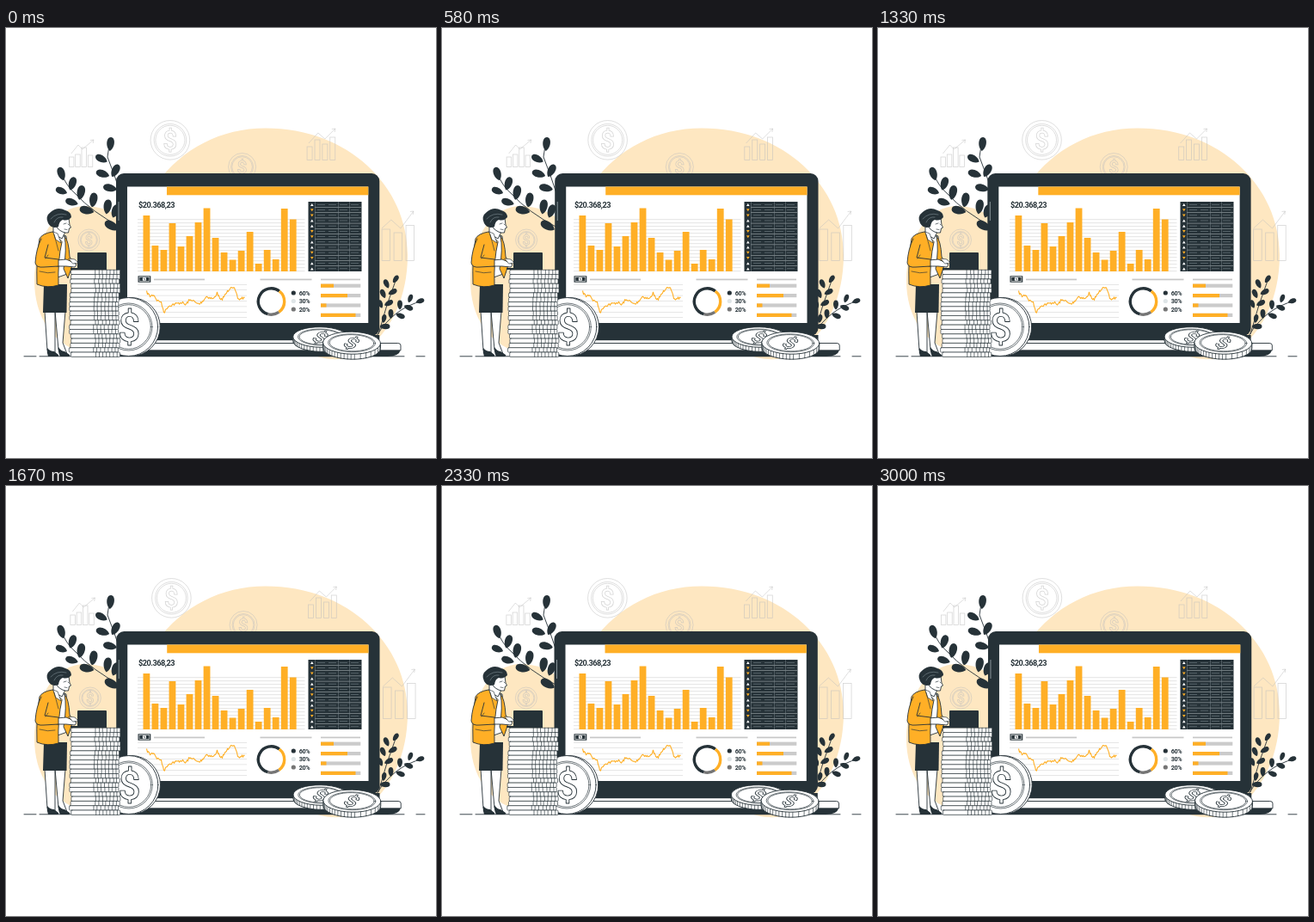
Animation of 500 by 500 pixels, one loop 3040 ms. Source, as an HTML page:

```html
<!DOCTYPE html>
<html lang="en">
<head>
<meta charset="utf-8">
<title>Finance dashboard</title>
<style>
html, body { margin: 0; width: 100%; height: 100%; overflow: hidden; background: #fff; }
svg { display: block; width: 100vw; height: 100vh; }
text { font-family: Roboto, "Liberation Sans", sans-serif; font-weight: 700; }
.ink { fill: #263238; }
.gold { fill: #ffaf26; }
.cream { fill: #fee7c1; }
.line { fill: #fff; stroke: #263238; stroke-width: .9; stroke-linejoin: round; stroke-linecap: round; }
.bare { fill: none; }
.coat { fill: #ffaf26; }
.thin { stroke-width: .65; }
.icon { fill: none; stroke: #bdbdbd; stroke-opacity: .65; stroke-width: .75; }
.sign { text-anchor: middle; font-weight: 500; }
.stem { fill: none; stroke: #263238; stroke-width: .9; }
</style>
</head>
<body>
<svg viewBox="0 0 500 500">
  <g class="cream">
    <path d="M175 181C205 140 250 116.500 302 116.500C398 116.500 467 184 467 264C467 314 447 350 424 370C409 385 386 388 366 383L300 366Z"/>
    <path d="M92 207C56 207 33 247 33 294C33 335 54 369 92 378H140V226C126 213 108 207 92 207Z"/>
  </g>
  <g id="icons" class="icon"></g>
  <g id="plants" class="ink"></g>
  <path class="line bare" d="M21 381.800H35M39 381.800H463M477 381.800H487"/>
  <g id="laptop"></g>
  <g id="screen"></g>
  <g id="coins"></g>
  <g id="woman">
    <path class="line" d="M45 329L48 375L57 379L57 329ZM57 329L61 374L71 379L66 366L69 329Z"/>
    <path class="ink" d="M44 298H71L70.500 331H43Z"/>
    <path class="ink" d="M48 372Q51 376 56 376L61 380Q62 382 59 382H49Q47 377 48 372ZM61 371Q64 376 68 376L74 380Q75 382 72 382H63Q60 376 61 371Z"/>
    <path class="line" d="M59 238L70 242L74 285L60 290Z"/>
    <path class="line" d="M55 229L55 239L65 245L69 237Z"/>
    <path class="line" d="M56 220L73 221L74 229L75.500 232L73.500 233L72.500 238Q66 239 60 233Z"/>
    <path class="ink" d="M49 227Q45 219 52 214Q60 207 69 212Q76 214 76 220Q72 225 66 223Q62 224 61 231Q53 234 49 227Z"/>
    <path class="line bare thin" style="stroke:#78858b" d="M52 222Q59 214 70 217M56 226Q59 219 66 220"/>
    <path class="line bare thin" d="M67 228L70 227M72 228L73 229M68 234L71 234.500"/>
    <path class="line coat" d="M54 237Q42 239 39 245Q35 266 36 298Q48 303 61 299Q60 270 65 249Z"/>
    <path class="line coat" d="M68 242Q73 247 74 266L78 273L72 291L67 280Q71 257 68 242Z"/>
    <path class="line thin" d="M55 237L60 239L64 250L58 246Z"/>
    <path class="line" d="M59 270L70 269L77 272L82 275L80 278L70 277L59 277Z"/>
    <path class="line coat" d="M41 245Q35 257 34 273Q35 279 44 278L61 277V269L45 267L49 252"/>
    <path class="line bare thin" d="M39 283Q49 286 57 284M46 268L49 264M56 240L61 259"/>
    <path class="line thin" d="M73 268L80 269L84 273L78 274Z"/>
    <path class="ink" d="M83 262Q83 261 84 261H116Q117 261 117 262V281H83ZM75 279H117V281H75Z"/>
  </g>
</svg>
<script>
const NS = "http://www.w3.org/2000/svg";
const $ = id => document.getElementById(id);

function add(parent, tag, attrs, text) {
  const el = document.createElementNS(NS, tag);
  for (const k in attrs) el.setAttribute(k, attrs[k]);
  if (text) el.textContent = text;
  parent.append(el);
  return el;
}
const rect = (p, x, y, width, height, attrs) => add(p, "rect", { x, y, width, height, ...attrs });
const path = (p, d, attrs) => add(p, "path", { d, ...attrs });
const circle = (p, cx, cy, r, attrs) => add(p, "circle", { cx, cy, r, ...attrs });
const dollar = (p, x, y, size, attrs, turn = "") => add(p, "text", {
  "font-size": size, y: size * .36, transform: `translate(${x} ${y}) ${turn}`, ...attrs
}, "$");

let seed = 7;
const rnd = () => (seed = seed * 16807 % 2147483647) / 2147483647;

// Outline icons
const icons = $("icons");
function growth(x, base, w, step, tops, arrow) {
  tops.forEach((y, i) => rect(icons, x + i * step, y, w, base - y));
  path(icons, "M" + arrow);
  const [ax, ay] = arrow.split(" ").slice(-2).map(Number);
  path(icons, `M${ax - 4} ${ay + .5}L${ax} ${ay}L${ax - .7} ${ay + 4}`);
}
growth(73.5, 161.5, 5.5, 7.3, [150, 147, 139, 148], "76 146 L 84 136 L 89 141 L 102 130");
growth(350.2, 153.5, 6, 8.9, [138, 130, 135, 127], "352 134 L 363 122 L 371 129 L 383 117");
growth(437.2, 270.5, 9.5, 14, [234, 238, 229.5], "437 233 L 448 223 L 459 233 L 474 213");
function token(x, y, radii, size) {
  radii.forEach(r => circle(icons, x, y, r));
  dollar(icons, x, y, size, { class: "sign" });
}
token(191, 130.3, [22.8, 18.8, 17], 30);
token(274.7, 161.5, [16, 13, 11.8], 21);
token(96.5, 246.5, [12.5, 10, 9], 16);

// Plants: x, y, angle, half length per leaf
const plants = $("plants");
function plant(stem, leaves, fat) {
  path(plants, stem, { class: "stem" });
  for (const [x, y, a, l] of leaves)
    path(plants, `M0 ${l}C${-fat * l} ${l * .5} ${-fat * l} ${-l} 0 ${-l}C${fat * l} ${-l} ${fat * l} ${l * .5} 0 ${l}`,
      { transform: `translate(${x} ${y}) rotate(${a})` });
}
plant("M134 195Q126 170 118 150Q119 142 121 132", [
  [121.5, 135, 5, 8], [111, 152, -62, 7.5], [127, 166, 28, 8], [112.5, 169.5, -72, 8], [121, 186, -78, 8]
], .72);
plant("M134 232Q100 214 81 193Q70 184 64 168", [
  [64.5, 169.5, -18, 8], [77, 181, 18, 8], [64.5, 189.5, -68, 7], [87, 191.5, 12, 8.5], [76.5, 202.5, -72, 7.5],
  [101.5, 200, 10, 8.5], [94, 212, -76, 8.5], [118, 208, 8, 8.5], [123, 230, -60, 9], [127, 213, 20, 8]
], .72);
plant("M433 356Q442 322 454 291", [
  [453, 292, 35, 5], [442.5, 297.5, -25, 5.5], [449.5, 307, 62, 5.5], [438.5, 309, -25, 5.5], [445, 320, 62, 5.5], [435.500, 321, -20, 5]
], .72);
plant("M431 358Q450 326 485 317", [
  [481.500, 317.500, 72, 5], [470, 314.500, 20, 5], [468, 325, 112, 5.5], [458, 322, 0, 5.500], [458.500, 334.500, 112, 5.5],
  [447.500, 332.500, 0, 5.5], [440.500, 347, 90, 6], [439.5, 338, 10, 5]
], .72);

// Laptop body
const laptop = $("laptop");
path(laptop, "M120 362.800H340V366.500H120Z", { class: "line thin" });
rect(laptop, 128.2, 169, 306.3, 189, { rx: 9, class: "ink" });
path(laptop, "M176 357H434.500V363H176Z", { class: "ink" });
path(laptop, "M131.200 202V224", { stroke: "#8a969b", "stroke-width": 1 });
rect(laptop, 141.2, 184.5, 280.3, 158.5, { fill: "#fff" });
rect(laptop, 187.2, 184.5, 234.3, 9.8, { class: "gold" });
path(laptop, "M130 374.500H459Q457 382 444 382H130Z", { class: "ink" });
path(laptop, "M130 366.500H456Q459.200 366.500 459.200 369V374.800H130Z", { class: "line" });

// Dashboard contents
const screen = $("screen");
add(screen, "text", { x: 154, y: 209, "font-size": 9.2, "letter-spacing": -.5, class: "ink" }, "$20.368,23");
for (let y = 222.5; y < 284; y += 4) rect(screen, 153, y, 194.5, .6, { fill: "#d2d2d2" });
[218, 253, 258, 227, 254, 242, 226, 209.5, 244, 261, 269.5, 259, 237, 274, 258, 269, 210, 222.5]
  .forEach((y, i) => rect(screen, 159.5 + i * 10.02, y, 7.8, 283 - y, { class: "gold" }));

rect(screen, 351.5, 202, 62, 81, { class: "ink" });
for (let i = 0; i < 13; i++) {
  const y = 202 + i * 6.2;
  if (i) rect(screen, 359, y, 54, .55, { fill: "#aeb6b9" });
  const down = i % 4 === 1 || i % 4 === 2;
  path(screen, down ? `M354 ${y + 2}h3.600l-1.800 3z` : `M354 ${y + 5}h3.600l-1.800 -3z`, { fill: down ? "#ffaf26" : "#fff" });
  for (const x of [362, 375, 388, 401])
    rect(screen, x, y + 3, 9, .7, { fill: "#69767c" });
}
for (const x of [359, 386, 399.5]) rect(screen, x, 202, .5, 81, { fill: "#78858a" });

rect(screen, 153.5, 288.3, 14.8, 7.4, { class: "ink" });
rect(screen, 155, 289.4, 11.8, 5.2, { fill: "none", stroke: "#fff", "stroke-width": .6 });
circle(screen, 160.9, 292, 2.2, { fill: "#fff" });
dollar(screen, 160.9, 292, 4, { class: "ink sign" });
[[172, 59], [295.5, 60], [366, 46]].forEach(([x, w]) => rect(screen, x, 291.6, w, 1.7, { fill: "#c7c7c7" }));

for (let y = 298; y < 338; y += 6.4) rect(screen, 153, y, 127, .6, { fill: "#d6d6d6" });
const trend = [307, 312, 310, 317, 318, 331, 324, 322, 321, 320, 319, 322, 317, 316, 320, 321, 317, 312, 314, 315, 308, 317, 312, 306, 300, 304, 316, 314, 314];
let d = "";
for (let x = 0; x <= 114; x++) {
  const k = Math.min(x / 4.1, 27.99), i = Math.floor(k);
  const y = trend[i] + (trend[i + 1] - trend[i]) * (k - i) + (rnd() - .5) * 3;
  d += (x ? "L" : "M") + (163.5 + x) + " " + y.toFixed(1);
}
path(screen, d, { fill: "none", stroke: "#ffaf26", "stroke-width": 1.1 });

function arc(from, to, stroke) {
  const at = a => `${308.5 + 15.2 * Math.cos(a * Math.PI / 180)} ${318 + 15.2 * Math.sin(a * Math.PI / 180)}`;
  path(screen, `M${at(from)}A15.200 15.200 0 ${+(to - from > 180)} 1 ${at(to)}`, { fill: "none", stroke, "stroke-width": 3.4 });
}
arc(105, 308, "#263238");
arc(-52, 55, "#ffaf26");
arc(55, 105, "#757575");
["60%", "30%", "20%"].forEach((label, i) => {
  const y = 308 + i * 9.5;
  circle(screen, 334.3, y, 2.6, { fill: ["#263238", "#dfe5e7", "#757575"][i] });
  add(screen, "text", { x: 340.8, y: y + 2.6, "font-size": 7.2, "letter-spacing": -.45, class: "ink" }, label);
});
[15, 31, 6.5, 40.5].forEach((w, i) => {
  const y = 297.6 + i * 11.4;
  rect(screen, 366, y, 46.3, 4.2, { fill: "#cbcbcb" });
  rect(screen, 366, y, w, 4.2, { class: "gold" });
});

// Coins and stack
const coins = $("coins");
circle(coins, 145.5, 347.5, 34, { class: "line" });
circle(coins, 142.8, 347.5, 34, { class: "line" });
circle(coins, 142.8, 347.5, 27.5, { class: "line thin" });
circle(coins, 142.8, 347.5, 25.8, { class: "line thin" });
dollar(coins, 143.5, 347.5, 46, { class: "line sign" });

function flatCoin(x, y, rx, ry, h, tilt) {
  const g = add(coins, "g", { transform: `translate(${x} ${y}) rotate(${tilt})` });
  path(g, `M${-rx} 0V${h}A${rx} ${ry} 0 0 0 ${rx} ${h}V0Z`, { class: "line" });
  for (let a = 12; a < 175; a += a < 75 ? 12 : 7) {
    const c = rx * Math.cos(a * Math.PI / 180), s = ry * Math.sin(a * Math.PI / 180);
    path(g, `M${c} ${s}v${h}`, { class: "line bare thin" });
  }
  add(g, "ellipse", { rx, ry, class: "line" });
  add(g, "ellipse", { rx: rx * .82, ry: ry * .8, class: "line thin" });
  add(g, "ellipse", { rx: rx * .77, ry: ry * .74, class: "line thin" });
  dollar(g, 0, 0, 27, { class: "line sign" }, "rotate(14) skewX(-24) scale(1 .68)");
}
flatCoin(366, 359.5, 32, 11.8, 5, 1);
flatCoin(402.3, 366.2, 33.5, 13, 6, 1);

for (let i = 0; i < 19; i++) {
  const y = 281.3 + i * 5.32, x = 74.8 + (rnd() - .5) * 2.6;
  rect(coins, x, y, 57, 5.32, { rx: 1, class: "line thin" });
  for (let k = 0; k < 7; k++)
    path(coins, `M${x + 28 + k * 4.2 + rnd()} ${y}v5.300`, { class: "line bare thin" });
}

// Shake: one keyframe per tenth of the cycle
const offsets = [0, -1, 2, -4, 4, -4, 4, -4, 2, -1, 0];
function shake(t, period) {
  const k = t % period / period * 10, i = Math.floor(k);
  return offsets[i] + (offsets[i + 1] - offsets[i]) * (k - i);
}
const LOOP = 3040, STEP = 1000 / 24, LEAD = 35;
const start = performance.now();
function draw() {
  const now = (performance.now() - start) % LOOP;
  const t = Math.floor((now + 5) / STEP) * STEP + LEAD;
  const move = (el, x) => el.setAttribute("transform", `translate(${x.toFixed(2)} 0)`);
  move(icons, shake(t, 3000));
  move(laptop, shake(t, 1500));
  move(coins, shake(t, 1500));
  requestAnimationFrame(draw);
}
draw();
</script>
</body>
</html>
```
